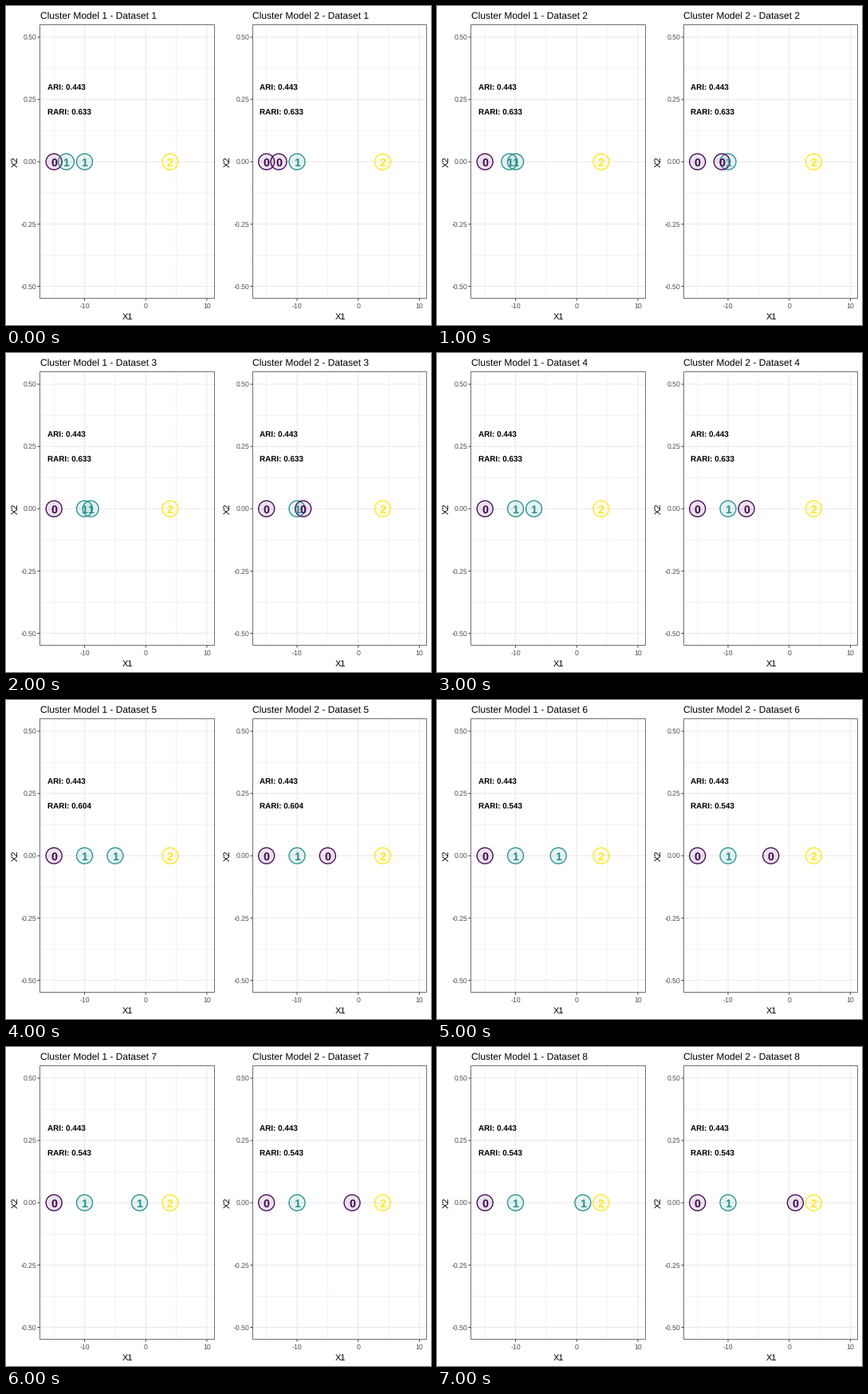
Animation of 533 by 400 pixels, one loop 8000 ms. Source, as a matplotlib script:

```python
import matplotlib.pyplot as plt
from matplotlib.animation import FuncAnimation
from matplotlib.patches import Circle, Rectangle

W, H, DPI = 533, 400, 100
PX = 72 / DPI  # points per pixel
TOP, BOTTOM = 23.5, 366.5
PANELS = ((42.5, 261.5), (309.5, 527.5))  # left and right edges
ORIGINS = (175.2, 441.7)  # where X1 = 0
UNIT_X, UNIT_Y = 7.67, 312.4
COLORS = ("#440154", "#21908C", "#FDE725")
GRID, BORDER, TICK, LABEL = "#EBEBEB", "#707070", "#333333", "#4D4D4D"

plt.rcParams.update({"font.family": "Liberation Sans", "path.snap": False,
                     "text.hinting": "none"})
fig = plt.figure(figsize=(W / DPI, H / DPI), dpi=DPI, facecolor="white")
ax = fig.add_axes([0, 0, 1, 1])
ax.set_xlim(0, W)
ax.set_ylim(H, 0)
ax.axis("off")


def to_y(value):
    return 195.3 - value * UNIT_Y


def line(x0, y0, x1, y1, color, width, z):
    ax.plot([x0, x1], [y0, y1], color=color, lw=width * PX, zorder=z,
            solid_capstyle="butt")


def label(x, y, text, size, color="black", ha="left", va="baseline", z=5, **kw):
    return ax.text(x, y, text, fontsize=size * PX, color=color, ha=ha, va=va,
                   zorder=z, **kw)


def draw_panel(origin, left, right):
    for v in (-15, -5, 5):
        x = origin + v * UNIT_X
        line(x, TOP, x, BOTTOM, GRID, 0.6, 1)
    for v in (-0.375, -0.125, 0.125, 0.375):
        line(left, to_y(v), right, to_y(v), GRID, 0.6, 1)
    for v in (-10, 0, 10):
        x = origin + v * UNIT_X
        line(x, TOP, x, BOTTOM, GRID, 1.1, 2)
        line(x, BOTTOM, x, BOTTOM + 3, TICK, 1, 2)
        label(x, 379, str(v), 8.8, LABEL, "center")
    for v in (-0.5, -0.25, 0, 0.25, 0.5):
        y = to_y(v)
        line(left, y, right, y, GRID, 1.1, 2)
        line(left - 3, y, left, y, TICK, 1, 2)
        label(left - 4.5, y + 3.1, f"{v:.2f}", 8.6, LABEL, "right")
    ax.add_patch(Rectangle((left, TOP), right - left, BOTTOM - TOP, fill=False,
                           ec=BORDER, lw=PX, zorder=8))
    label((left + right) / 2 + 0.5, 393, "X1", 11, ha="center")
    label(origin - 163.7, 195.3, "X2", 11, ha="center", va="center", rotation=90)
    label(origin - 123.2, 106, "ARI: 0.443", 9.9, weight="bold")


def draw_point(origin, value, cluster, order):
    color = COLORS[cluster]
    center = (origin + value * UNIT_X, to_y(0))
    z = 3 + order / 10
    disc = Circle(center, 10, fc=color, alpha=0.1, ec="none", zorder=z)
    ring = Circle(center, 10, fill=False, ec=color, lw=1.3 * PX, zorder=z + 0.05)
    ax.add_patch(disc)
    ax.add_patch(ring)
    digit = label(center[0], 201.3, str(cluster), 14.2, color, "center",
                  z=z + 3, weight="bold")
    return disc, ring, digit


titles, scores, movers = [], [], []
for origin, (left, right), cluster in zip(ORIGINS, PANELS, (1, 0)):
    draw_panel(origin, left, right)
    titles.append(label(origin - 132.5, 15.5, "", 12))
    scores.append(label(origin - 123.2, 137, "", 9.9, weight="bold"))
    draw_point(origin, -15, 0, 0)
    draw_point(origin, -10, 1, 1)
    movers.append(draw_point(origin, -13, cluster, 2))
    draw_point(origin, 4, 2, 3)


def rari(step):
    if step < 4:
        return 0.633
    return 0.604 if step == 4 else 0.543


def update(step):
    for i, origin in enumerate(ORIGINS):
        titles[i].set_text(f"Cluster Model {i + 1} - Dataset {step + 1}")
        scores[i].set_text(f"RARI: {rari(step):.3f}")
        x = origin + (-13 + 2 * step) * UNIT_X
        disc, ring, digit = movers[i]
        disc.center = ring.center = (x, to_y(0))
        digit.set_x(x)
    return []


anim = FuncAnimation(fig, update, frames=8, interval=1000, repeat=True,
                     repeat_delay=0, init_func=lambda: update(0))
plt.show()
```
